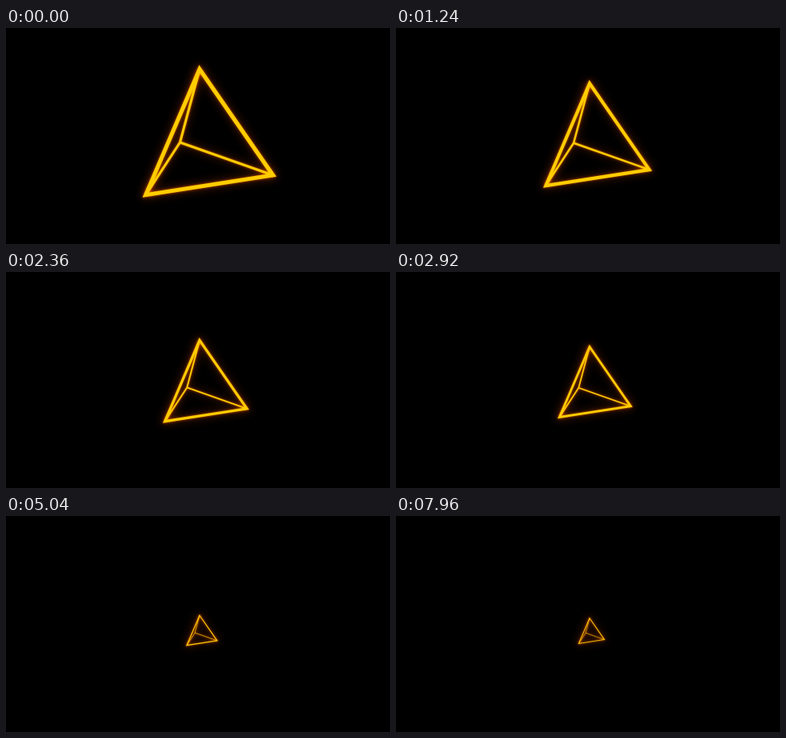
An HTML page with a canvas for the animation above (8 s loop, 480 by 270 pixels).

```html
<!DOCTYPE html>
<html lang="en">
<head>
<meta charset="utf-8">
<title>Neon pyramid</title>
<style>
html, body { margin: 0; width: 100%; height: 100%; overflow: hidden; background: #000; }
canvas { display: block; width: 480px; height: 270px; }
</style>
</head>
<body>
<canvas id="stage" width="480" height="270"></canvas>
<script>
const ctx = document.getElementById('stage').getContext('2d');

const LOOP = 8000;
const HOLDS = [120, 120, 100, 120, 100, 120, 140, 100, 100, 100];
const CYCLE = HOLDS.reduce((a, b) => a + b);
const ZERO_STEP = 59.1;

// Vertices relative to the point the pyramid shrinks into
const CENTER = [242, 147];
const APEX = [0, -95.5], RIGHT = [91.7, 37], LEFT = [-67.3, 61.6], BACK = [-24.5, -4];

// Count of held poses passed at time t
function stepAt(t) {
  let step = Math.floor(t / CYCLE) * HOLDS.length;
  let rest = t % CYCLE;
  for (const hold of HOLDS) {
    if (rest < hold) break;
    rest -= hold;
    step++;
  }
  return step;
}

function trace(points, scale) {
  for (const [i, [x, y]] of points.entries()) {
    ctx[i ? 'lineTo' : 'moveTo'](CENTER[0] + x * scale, CENTER[1] + y * scale);
  }
}

function wire(scale, color, extra, blur, mode) {
  ctx.save();
  ctx.globalCompositeOperation = mode;
  ctx.filter = blur ? `blur(${blur}px)` : 'none';
  ctx.strokeStyle = color;

  ctx.beginPath();
  for (const corner of [APEX, RIGHT, LEFT]) trace([BACK, corner], scale);
  ctx.lineWidth = Math.max(3 * scale, 0.4) + extra;
  ctx.stroke();

  ctx.beginPath();
  trace([APEX, RIGHT, LEFT], scale);
  ctx.closePath();
  ctx.lineWidth = Math.max(5 * scale, 0.5) + extra;
  ctx.stroke();
  ctx.restore();
}

function draw(t) {
  const scale = Math.abs(1 - stepAt(t) / ZERO_STEP);
  ctx.fillStyle = '#000';
  ctx.fillRect(0, 0, 480, 270);
  wire(scale, 'rgba(255, 80, 0, 0.36)', 1, 6, 'lighter');
  wire(scale, 'rgba(255, 105, 0, 0.55)', 0.6, 1.4, 'lighter');
  wire(scale, '#ffcd00', 0, 0, 'source-over');
}

function tick() {
  draw(performance.now() % LOOP);
  requestAnimationFrame(tick);
}
tick();
</script>
</body>
</html>
```
